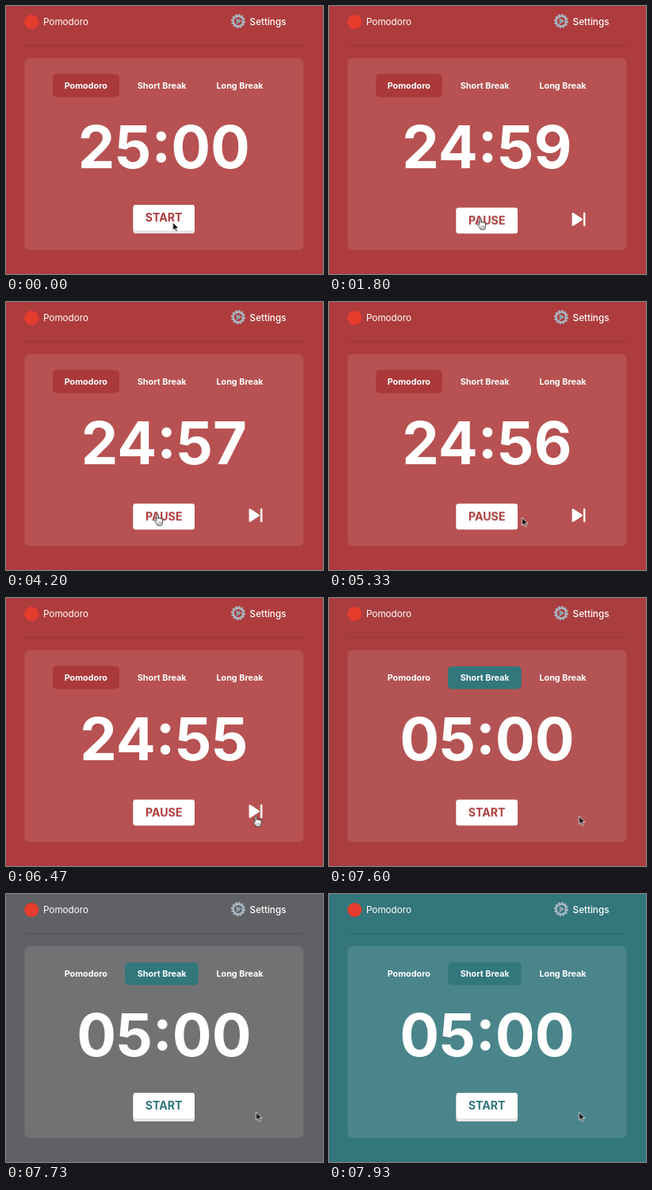
These frames come from a looping animation (400x337 px, 8 s). An HTML page:

```html
<!DOCTYPE html>
<html lang="en">
<head>
<meta charset="utf-8">
<title>Pomodoro timer</title>
<style>
  :root { --red: #ae3c3d; --teal: #31777c; }
  html, body { margin: 0; width: 100%; height: 100%; overflow: hidden; }
  body { background: var(--red); animation: page 8s infinite; }
  svg { display: block; }
  text { font-family: Inter, sans-serif; fill: #fff; text-anchor: middle; }
  .head { font-size: 11.7px; }
  .tab { font-size: 10.8px; font-weight: 700; }
  .time { font-size: 74px; font-weight: 700; }
  .label { font-size: 14.2px; font-weight: 700; fill: var(--red); }

  /* Hard state changes */
  .step { animation: 8s step-end infinite; }
  .reel { animation-name: reel; }
  .button { animation-name: press; }
  .start { animation-name: start; }
  .pause { animation-name: pause; }
  .focus { animation-name: focus; }
  .rest { animation-name: rest; }
  .arrow { animation-name: arrow; }
  .hand { animation-name: hand; }

  .skip { animation: skip 8s infinite; }
  .cursor { animation: move 8s infinite; }

  @keyframes page {
    0%, 94.75% { background: var(--red); animation-timing-function: ease; }
    100% { background: var(--teal); }
  }
  @keyframes reel {
    0% { transform: translateY(0); }
    19% { transform: translateY(-100px); }
    31.5% { transform: translateY(-200px); }
    44% { transform: translateY(-300px); }
    56.5% { transform: translateY(-400px); }
    69% { transform: translateY(-500px); }
    81.5% { transform: translateY(-600px); }
    94% { transform: translateY(-700px); }
    94.44%, 100% { transform: translateY(-800px); }
  }
  @keyframes press {
    0%, 95.75%, 100% { transform: translateY(0); }
    5.75% { transform: translateY(3.7px); }
  }
  @keyframes start {
    0% { opacity: 1; fill: var(--red); }
    6.5% { opacity: 0; fill: var(--red); }
    94.44% { opacity: 1; fill: var(--red); }
    95.75%, 100% { opacity: 1; fill: var(--teal); }
  }
  @keyframes pause {
    0%, 94.44%, 100% { opacity: 0; }
    6.5% { opacity: 1; }
  }
  @keyframes focus {
    0% { opacity: 1; }
    94.44%, 100% { opacity: 0; }
  }
  @keyframes rest {
    0% { opacity: 0; }
    94.44%, 100% { opacity: 1; }
  }
  @keyframes skip {
    0%, 6.5% { opacity: 0; }
    10.4%, 94.43% { opacity: 1; }
    94.44%, 100% { opacity: 0; }
  }
  @keyframes arrow {
    0%, 66.2%, 70.3%, 94.44%, 100% { opacity: 1; }
    1.5%, 69.2%, 80% { opacity: 0; }
  }
  @keyframes hand {
    0%, 66.2%, 70.3%, 94.44%, 100% { opacity: 0; }
    1.5%, 69.2%, 80% { opacity: 1; }
  }
  @keyframes move {
    0%, 1.5% { transform: translate(210.5px, 272px); }
    5.6%, 63% { transform: translate(191px, 267.5px); animation-timing-function: ease-in-out; }
    71.4%, 77% { transform: translate(327px, 276.5px); }
    78.4% { transform: translate(362px, 294px); }
    80.6%, 100% { transform: translate(315.5px, 274.3px); }
  }
</style>
</head>
<body>
<svg width="400" height="337" viewBox="0 0 400 337">
  <circle cx="32.3" cy="20" r="9" fill="#e63c2d"/>
  <text class="head" x="75.5" y="24">Pomodoro</text>

  <g transform="translate(293 19)" fill="none" stroke="#a9bac6">
    <circle r="8" stroke-width="2" pathLength="24" stroke-dasharray="1.15 .85"/>
    <circle r="6.3" stroke-width="2.2"/>
    <path d="M0 0H5.5M0 0L-2.8 4.8M0 0L-2.8 -4.8" stroke="#8599a6" stroke-width="1.4"/>
    <circle r="2" fill="#7d909d" stroke-width="1"/>
  </g>
  <text class="head" x="330.5" y="24" font-weight="500">Settings</text>

  <rect x="23.5" y="49.5" width="352" height="1.2" fill="#000" opacity=".1"/>
  <rect x="23.5" y="65.5" width="352" height="241.5" rx="6" fill="#fff" opacity=".11"/>

  <rect class="step focus" x="59" y="85.5" width="84" height="29" rx="5" fill="#ab393a"/>
  <rect class="step rest" x="150" y="86" width="92.7" height="28.5" rx="5" fill="#31777c"/>
  <text class="tab" x="100.8" y="104">Pomodoro</text>
  <text class="tab" x="196.7" y="104">Short Break</text>
  <text class="tab" x="295" y="104">Long Break</text>

  <svg y="135" width="400" height="80" overflow="hidden">
    <g class="step reel time">
      <text x="199.4" y="68.5">25:00</text>
      <text x="199.4" y="168.5">24:59</text>
      <text x="199.4" y="268.5">24:58</text>
      <text x="199.4" y="368.5">24:57</text>
      <text x="199.4" y="468.5">24:56</text>
      <text x="199.4" y="568.5">24:55</text>
      <text x="199.4" y="668.5">24:54</text>
      <text x="199.4" y="768.5">24:53</text>
      <text x="199.4" y="868.5">05:00</text>
    </g>
  </svg>

  <rect x="160.5" y="253.7" width="77.5" height="32.3" rx="3" fill="#ebe4e7"/>
  <g class="step button">
    <rect x="160.5" y="250" width="77.5" height="32.3" rx="3" fill="#fff"/>
    <text class="label step start" x="199.2" y="271.2">START</text>
    <text class="label step pause" x="199.2" y="271.2">PAUSE</text>
  </g>

  <g class="skip" fill="#fff" stroke="#fff" stroke-linejoin="round">
    <path d="M307.8 261V275.6L318.6 268.3Z" stroke-width="2.4"/>
    <rect x="321.2" y="259.8" width="2" height="17" rx=".6" stroke-width=".4"/>
  </g>

  <g class="cursor" stroke-linejoin="round">
    <path class="step arrow" d="M0 0V10.2L2.4 8L4 11.8L5.8 11L4.2 7.4H7.4Z" fill="#111" stroke="#fff" stroke-width=".8"/>
    <g class="step hand" fill="#fff" stroke="#222" stroke-width=".9">
      <path d="M-1.2 1.2a1.1 1.1 0 0 1 2.2 0V5a1 1 0 0 1 2 0a1 1 0 0 1 2 .4a.95 .95 0 0 1 1.8 .6V8.6C6.8 10.5 5.8 11.2 5.6 13H-.2C-.6 11 -2.6 9.4 -3.4 7.6C-3.9 6.4 -2.4 6 -1.2 7.6Z"/>
      <path d="M1 8.8V11.2M2.9 8.8V11.2M4.7 8.8V11.2" stroke-width=".6"/>
    </g>
  </g>
</svg>
</body>
</html>
```
